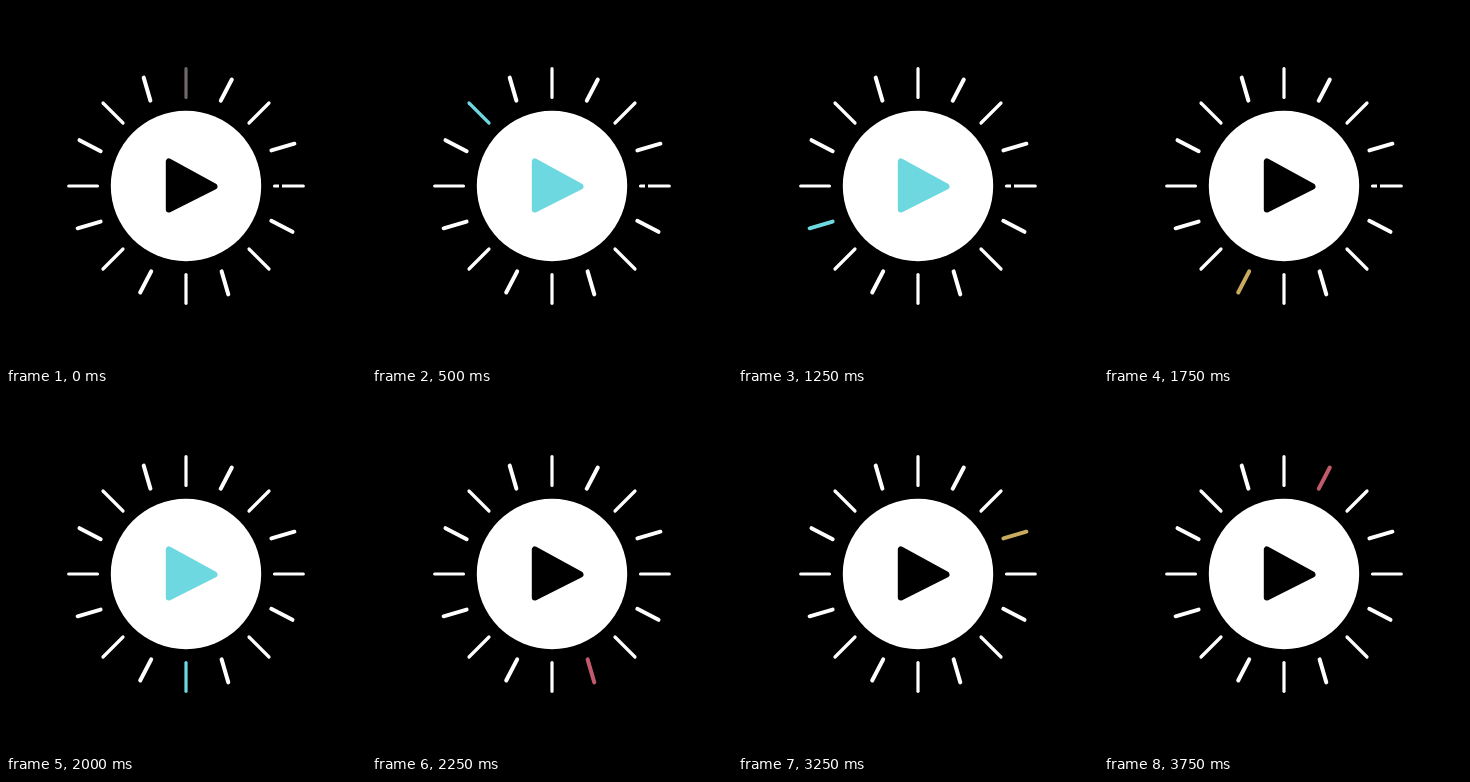
Animation of 360 by 360 pixels, one loop 4 s. Source, as an HTML page:

```html
<!DOCTYPE html>
<html lang="en">
<head>
<meta charset="utf-8">
<title>Play button with rays</title>
<style>
  html, body { margin: 0; width: 100%; height: 100%; overflow: hidden; background: #000; }
  svg { display: block; width: 100vw; height: 100vh; }
  .ray { stroke: #fff; stroke-linecap: round; }
  #play { fill: #000; stroke: #000; stroke-width: 6; stroke-linejoin: round; }
</style>
</head>
<body>
<svg viewBox="0 0 360 360">
  <g id="rays" transform="translate(180 180)"></g>
  <path id="gap" d="M274.5 177v6" stroke="#000" stroke-width="3"/>
  <circle cx="180" cy="180" r="75.2" fill="#fff"/>
  <path id="play" d="M162.8 155.5V203.5L208.5 180.5Z"/>
</svg>
<script>
const STEPS = 16, LOOP = 4000;
const GREY = '#706868', RED = '#c15b6c', GOLD = '#c9ab60', CYAN = '#6ed8e1';
const CYCLE = [RED, GOLD, CYAN];

// One quarter turn of rays, relative to the centre: x1, y1, x2, y2, width
const QUARTER = [
  [0, -117.3, 0, -88.5, 3.2],
  [-42.3, -108.4, -35.6, -85.4, 4],
  [-83, -83, -63, -63, 3.2],
  [-106.5, -45.8, -85.3, -34.8, 4]
];

// Loops a property through one held value per step
function hold(el, valueAt) {
  const frames = [];
  for (let i = 0; i <= STEPS; i++) {
    frames.push({ ...valueAt(i % STEPS), offset: i / STEPS, easing: 'steps(1, end)' });
  }
  el.animate(frames, { duration: LOOP, iterations: Infinity });
}

const rays = document.getElementById('rays');
for (let i = 0; i < STEPS; i++) {
  const [x1, y1, x2, y2, width] = QUARTER[i % 4];
  const ray = document.createElementNS('http://www.w3.org/2000/svg', 'path');
  ray.setAttribute('class', 'ray');
  ray.setAttribute('d', `M${x1} ${y1}L${x2} ${y2}`);
  ray.setAttribute('stroke-width', width);
  ray.setAttribute('transform', `rotate(${-90 * Math.floor(i / 4)})`);
  rays.append(ray);
  const lit = i === 0 ? GREY : CYCLE[i % 3];
  hold(ray, step => ({ stroke: step === i ? lit : '#fff' }));
}

hold(document.getElementById('play'), step => {
  const color = step % 3 === 2 ? CYAN : '#000';
  return { fill: color, stroke: color };
});
hold(document.getElementById('gap'), step => ({ opacity: step < 8 ? 1 : 0 }));
</script>
</body>
</html>
```
